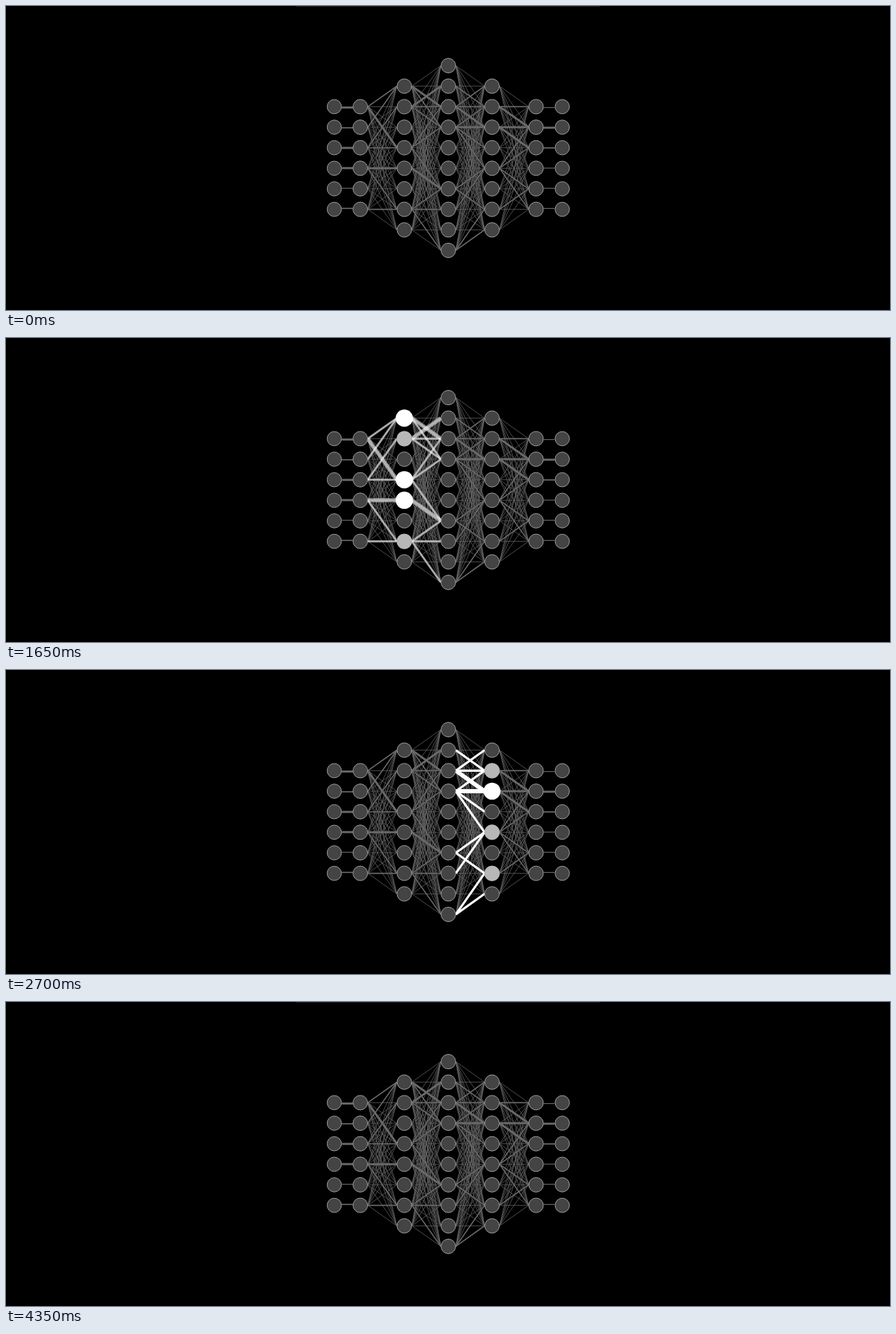
An HTML page with a canvas that plays this animation: 1275 by 439 pixels, repeating every 4500 ms.

```html
<!DOCTYPE html>
<html>
<head>
<meta charset="utf-8">
<style>
  html, body { margin: 0; height: 100%; overflow: hidden; background: #000; }
  canvas { display: block; }
</style>
</head>
<body>
<canvas id="stage" width="1275" height="439"></canvas>
<script>
const ctx = document.getElementById('stage').getContext('2d');
const STEP = 150, STEPS = 30;
const MID_Y = 219.5, GAP = 29.65;

// lit: one digit per node (0 = idle, 1 = grey, 2 = white)
const layers = [
  { x: 473.5, lit: '212201', r: 10.3, grey: 11.6, white: 13.6 },
  { x: 511, lit: '212201', r: 10.5, grey: 12, white: 13.6 },
  { x: 574.5, lit: '21022010', r: 10.5, grey: 11, white: 12.5 },
  { x: 638, lit: '0122002101', r: 10.5, grey: 11, white: 12.5 },
  { x: 701, lit: '01201010', r: 10.5, grey: 11, white: 12.3 },
  { x: 764.5, lit: '021000', r: 10.5, grey: 11, white: 12.2 },
  { x: 802.3, lit: '021000', r: 10.3, grey: 11.6, white: 13.6 }
];

// Strong links per gap: from-row, to-row, "+" for the heaviest
const strong = [
  '00+ 11 22+ 33+ 55',
  '00 03+ 10 21 23 34+ 36 56',
  '02+ 03 11+ 12 13 32 33 36 46+ 66 67 69',
  '11 20 21 22+ 31 32+ 33 34 64 66 74 96 97',
  '10 11+ 21+ 22+ 41 42 44 45 64',
  '11+ 22'
].map(list => list.split(' ').map(s => ({ from: +s[0], to: +s[1], heavy: s[2] === '+' })));

const rowY = (layer, row, gap = GAP) => MID_Y + (row - (layers[layer].lit.length - 1) / 2) * gap;

function link(gap, from, to, width, color) {
  const spacing = gap % 5 ? GAP : 29.15;
  ctx.lineWidth = width;
  ctx.strokeStyle = color;
  ctx.beginPath();
  ctx.moveTo(layers[gap].x + 10.8, rowY(gap, from, spacing));
  ctx.lineTo(layers[gap + 1].x - 10.8, rowY(gap + 1, to, spacing));
  ctx.stroke();
}

function disc(x, y, r, fill, stroke) {
  ctx.beginPath();
  ctx.arc(x, y, r, 0, Math.PI * 2);
  ctx.fillStyle = fill;
  ctx.fill();
  if (!stroke) return;
  ctx.lineWidth = 1;
  ctx.strokeStyle = stroke;
  ctx.stroke();
}

function idleLinks(gap) {
  const rows = layers[gap].lit.length, targets = layers[gap + 1].lit.length;
  const straight = gap % 5 === 0;
  for (let i = 0; i < rows; i++)
    for (let j = 0; j < targets; j++)
      if (!straight || i === j) link(gap, i, j, straight ? 1.2 : 0.75, '#696969');
  for (const s of strong[gap]) link(gap, s.from, s.to, s.heavy ? 3 : 1.6, '#696969');
}

function draw(step) {
  // Nodes and links take turns along one chain: node 0, link 1, node 2, ...
  const pos = (step - 3) / 2;
  const glow = k => step === STEPS - 1 ? 0 : Math.max(0, Math.min(1, 1.5 - Math.abs(pos - k)));

  ctx.globalAlpha = 1;
  ctx.fillStyle = '#000';
  ctx.fillRect(0, 0, 1275, 439);
  if (step === 0 || step === STEPS - 1) {
    ctx.fillStyle = '#222';
    ctx.fillRect(418, 0, 439, 1);
  }

  strong.forEach((links, gap) => {
    ctx.globalAlpha = 1;
    idleLinks(gap);
    ctx.globalAlpha = glow(2 * gap + 1);
    if (ctx.globalAlpha)
      for (const s of links) link(gap, s.from, s.to, s.heavy ? 6 : 3.2, '#fff');
  });

  layers.forEach((layer, i) => {
    [...layer.lit].forEach((level, row) => {
      const y = rowY(i, row);
      ctx.globalAlpha = 1;
      disc(layer.x, y, layer.r, '#444', '#a0a0a0');
      ctx.globalAlpha = glow(2 * i);
      if (level === '1') disc(layer.x, y, layer.grey, '#b7b7b7');
      if (level === '2') disc(layer.x, y, layer.white, '#fff');
    });
  });
}

function tick() {
  draw(Math.floor(performance.now() / STEP) % STEPS);
  requestAnimationFrame(tick);
}
tick();
</script>
</body>
</html>
```
